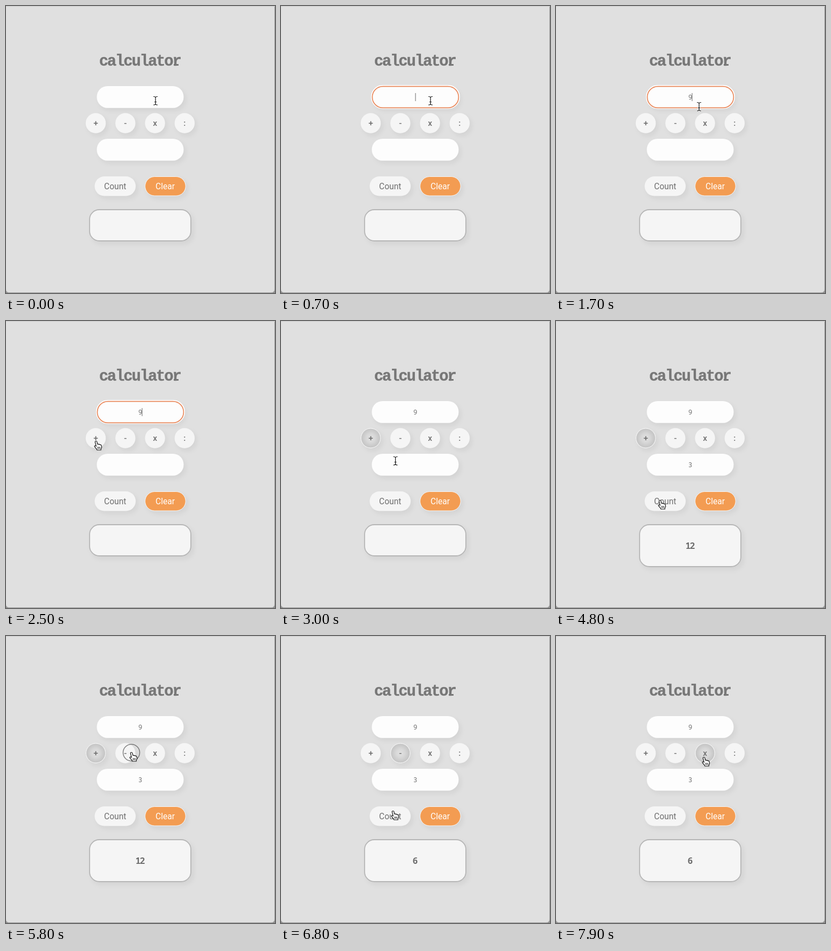
Recreate the animation shown at these times as an HTML page. Size 502x534 px, loop 8 s.

```html
<!DOCTYPE html>
<html lang="en">
<head>
<meta charset="utf-8">
<title>Calculator</title>
<style>
  html, body { margin: 0; width: 100%; height: 100%; overflow: hidden; background: #e0e0e0; }
  svg { display: block; width: 100%; height: 100%; }
  text { text-anchor: middle; fill: #6f6f6f; }
  .title { font: bold 29px "Liberation Mono", monospace; letter-spacing: -2.2px; fill: #777; stroke: #777; stroke-width: .4; }
  .label { font: 15.6px Roboto, sans-serif; }
  .op { font: 500 15.5px Roboto, sans-serif; }
  .digit { font: 500 12px "Noto Sans Mono", monospace; }
  .total { font: 600 16.5px "Noto Sans Mono", monospace; letter-spacing: -2px; }
  .soft { filter: drop-shadow(4px 5px 4px rgba(0, 0, 0, .055)); }
  .caret { stroke: #666; }
</style>
</head>
<body>
<svg viewBox="0 0 502 534">
  <defs>
    <radialGradient id="pressed">
      <stop offset="0" stop-color="#e2e2e2"/>
      <stop offset=".45" stop-color="#d8d8d8"/>
      <stop offset="1" stop-color="#c3c3c3"/>
    </radialGradient>
  </defs>
  <rect width="502" height="534" fill="#909090"/>
  <path d="M0 1H501V527Q501 533 495 533H6Q0 533 0 527Z" fill="#e0e0e0"/>
  <path d="M0 .5H502" stroke="#cbcbcb"/>
  <text class="title" x="249.7" y="111">calculator</text>
  <path d="M313 109.500h9" stroke="#777" stroke-width="3"/>
  <g id="fields"></g>
  <g id="ops"></g>
  <g class="soft">
    <rect x="165.5" y="317" width="76.5" height="36.5" rx="18.2" fill="#f5f5f5"/>
    <rect x="259.6" y="317.5" width="75.6" height="35.6" rx="17.8" fill="#f39c52" stroke="#f5f5f5"/>
    <rect id="panel" x="156" y="379" width="189" height="58" rx="18" fill="#f5f5f5" stroke="#b6b6b6" stroke-width="1.8"/>
  </g>
  <text class="label" x="203.7" y="341">Count</text>
  <text class="label" x="297" y="341" style="fill:#fff">Clear</text>
  <text id="total" class="total" x="249.5" y="424"></text>
  <circle id="ring" r="15.5" fill="none" stroke="#333" stroke-width="1.5" opacity=".6"/>
  <g id="pointer" stroke-linejoin="round" stroke-linecap="round">
    <path id="arrow" d="M0 0v12l2.800-2.600 1.900 4.300 2-.9-1.800-4.100h3.800z" fill="#111" stroke="#fff"/>
    <g id="hand" stroke="#111" stroke-width="1.2">
      <path d="M-1.700 1.200q0-1.700 1.700-1.700t1.900 1.700l.8 4q1.500-.8 2.300.4q1.600-.6 2.300.6q2.200-.4 2.600 1.400l.7 3.400-1.400 3v2h-7.400l-.8-1.900-3.700-4.300q-.6-1.300.6-1.700t2.400 1z" fill="#fff"/>
      <path d="M3.200 10.500v3M5.200 10.500v3M7.200 10.500v3" stroke-width=".9"/>
    </g>
    <g id="beam" fill="none"></g>
  </g>
</svg>
<script>
const LOOP = 8000, STEP = 100, SAG = .22;
const OP_Y = 218, OP_R = 18.7;
const byId = id => document.getElementById(id);
const show = (el, on) => el.setAttribute("visibility", on ? "inherit" : "hidden");
const within = (t, from, to) => t >= from && t < to;
const countBefore = (times, t) => times.filter(time => time <= t).length;

// The pointer is hidden from typing until it moves again.
const fields = [
  { y: 149, value: 9, focus: 500, typed: 1300, moved: 1600, blur: 2600 },
  { y: 247, value: 3, focus: 3100, typed: 3800, moved: 4200, blur: 4700 }
];
const ops = [..."+-x:"].map((sign, i) => ({ sign, x: 167.5 + 55.3 * i }));
const picked = [2600, 5900, 7900];
const counted = [4800, 6800];
const [a, b] = fields.map(f => f.value);
const results = ["", a + b, a - b];

// Where the pointer goes: leaving and arriving times, then how long it presses.
const stops = [
  { go: 0, at: 500, x: 279, y: 176, press: 200 },
  { go: 1300, at: 1700, x: 267, y: 187 },
  { go: 1700, at: 1900, x: 260, y: 208 },
  { go: 2000, at: 2500, x: 168, y: 224 },
  { go: 2700, at: 3100, x: 222, y: 260, press: 100 },
  { go: 4100, at: 4700, x: 194, y: 334, press: 100 },
  { go: 5100, at: 5800, x: 234, y: 217, press: 100 },
  { go: 5800, at: 5900, x: 232, y: 219 },
  { go: 6100, at: 6600, x: 196, y: 339, press: 200 },
  { go: 6700, at: 6800, x: 209, y: 326 },
  { go: 7000, at: 7800, x: 290, y: 213, press: 100 },
  { go: 7800, at: 7900, x: 276, y: 226 }
];

function build() {
  byId("fields").innerHTML = fields.map(({ y, value }) => `
    <g>
      <rect class="soft" x="169.5" y="${y}" width="162" height="40.7" rx="20" fill="#fdfdfd"/>
      <g>
        <rect x="169" y="${y - 1}" width="164" height="42.5" rx="21" fill="#fff" stroke="#fff" stroke-width="2"/>
        <rect x="170.4" y="${y + .6}" width="161" height="39.8" rx="19.7" fill="#fdfdfd" stroke="#e8875a" stroke-width="1.7"/>
      </g>
      <text class="digit" x="250.5" y="${y + 25.2}">${value}</text>
      <path class="caret" d="M0 ${y + 13}v15"/>
    </g>`).join("");
  byId("ops").innerHTML = ops.map(({ sign, x }) => `
    <g>
      <circle class="soft" cx="${x}" cy="${OP_Y}" r="${OP_R}" fill="#f5f5f5"/>
      <circle cx="${x}" cy="${OP_Y}" r="18" fill="url(#pressed)" stroke="#f0f0f0"/>
      <text class="op" x="${x}" y="${OP_Y + 5}">${sign}</text>
    </g>`).join("");
  const shape = "M-3.5-7.5q3 0 3.5 1.7q.5-1.7 3.5-1.7M0-6V6.500M-3.5 8q3 0 3.500-1.700q.5 1.700 3.500 1.700M-1.500 2.500h3";
  byId("beam").innerHTML =
    `<path d="${shape}" stroke="#fff" stroke-width="2.6"/><path d="${shape}" stroke="#111" stroke-width="1.2"/>`;

  fields.forEach((f, i) => {
    [, f.glow, f.text, f.caret] = byId("fields").children[i].children;
  });
  ops.forEach((op, i) => { op.dark = byId("ops").children[i].children[1]; });
}

// Eased travel that hangs a little below the straight line.
function pointerAt(t) {
  const i = stops.findLastIndex(s => s.go <= t);
  const to = stops[i], from = stops[Math.max(0, i - 1)];
  const k = Math.min(1, (t - to.go) / (to.at - to.go));
  const ease = k * k * (3 - 2 * k);
  const dx = to.x - from.x, dy = to.y - from.y;
  const sag = SAG * Math.abs(dx) * Math.sin(Math.PI * ease);
  return [from.x + dx * ease, from.y + dy * ease + sag];
}

function pointerKind(x, y) {
  const inBox = (l, top, w, h) => x >= l && x <= l + w && y >= top && y <= top + h;
  if (fields.some(f => inBox(169.5, f.y, 162, 40.7))) return "beam";
  const overOp = ops.some(op => Math.hypot(x - op.x, y - OP_Y) < OP_R);
  return overOp || inBox(165.5, 317, 76.5, 36.5) ? "hand" : "arrow";
}

function draw(time) {
  const t = Math.floor(time / STEP) * STEP;

  for (const f of fields) {
    const focused = within(t, f.focus, f.blur), filled = t >= f.typed;
    const blinkStart = filled ? f.typed : f.focus;
    show(f.glow, focused);
    show(f.text, filled);
    show(f.caret, focused && (t - blinkStart) % 1000 < 500);
    f.caret.setAttribute("transform", `translate(${filled ? 254 : 251})`);
  }

  const active = countBefore(picked, t) - 1;
  ops.forEach((op, i) => show(op.dark, i === active));

  const round = countBefore(counted, t);
  byId("panel").setAttribute("height", round ? 78 : 58);
  byId("total").textContent = results[round];

  const [x, y] = pointerAt(t), kind = pointerKind(x, y);
  const pointer = byId("pointer"), ring = byId("ring");
  pointer.setAttribute("transform", `translate(${x} ${y})`);
  show(pointer, !fields.some(f => within(t, f.typed, f.moved)));
  for (const id of ["arrow", "hand", "beam"])
    byId(id).setAttribute("display", id === kind ? "inline" : "none");
  ring.setAttribute("cx", x);
  ring.setAttribute("cy", y);
  show(ring, stops.some(s => s.press && within(t, s.at, s.at + s.press)));
}

build();
draw(0);
const start = performance.now();
(function tick() {
  draw((performance.now() - start) % LOOP);
  requestAnimationFrame(tick);
})();
</script>
</body>
</html>
```
